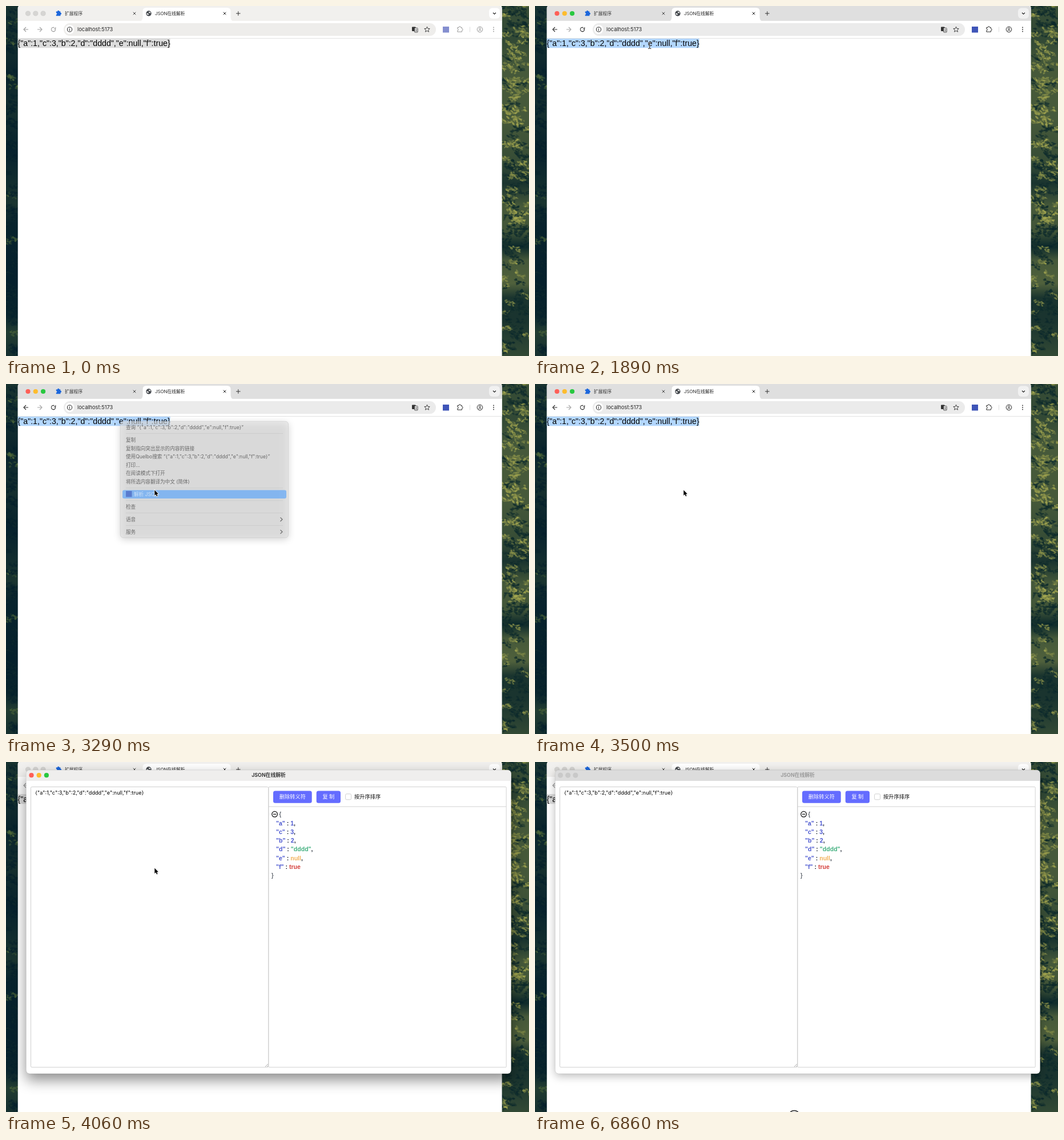
Write an HTML page with a canvas that moves like this. It is 916 by 612 pixels and loops after 6930 ms.

```html
<!DOCTYPE html>
<html lang="zh-CN">
<head>
<meta charset="utf-8">
<title>JSON在线解析</title>
<style>
html, body { margin: 0; width: 100%; height: 100%; overflow: hidden; background: #fff; }
canvas { display: block; }
</style>
</head>
<body>
<canvas id="stage" width="916" height="612"></canvas>
<script>
const W = 916, H = 612, LOOP = 6930, TICK = 70;
const LEFT = 20.5, WIDE = 848.3;
const UI = 'Inter, "Noto Sans CJK SC", "Noto Sans CJK", sans-serif';
const ARIAL = '"Liberation Sans", Arial, sans-serif';
const JSON_TEXT = '{"a":1,"c":3,"b":2,"d":"dddd","e":null,"f":true}';
const TITLE = 'JSON在线解析';
const LIGHTS = ['#fe5f57', '#febc2e', '#28c840'];
const ICON_BLUE = '#3f55b8';

const canvas = document.getElementById('stage');
let ctx = canvas.getContext('2d');

// Drawing helpers
function rect(x, y, w, h, fill) {
  ctx.fillStyle = fill;
  ctx.fillRect(x, y, w, h);
}

function box(x, y, w, h, r, fill, stroke, lw = 0.8) {
  ctx.beginPath();
  ctx.roundRect(x, y, w, h, r);
  if (fill) { ctx.fillStyle = fill; ctx.fill(); }
  if (stroke) { ctx.strokeStyle = stroke; ctx.lineWidth = lw; ctx.stroke(); }
}

function disc(x, y, r, fill, stroke, lw = 1) {
  ctx.beginPath();
  ctx.arc(x, y, r, 0, Math.PI * 2);
  if (fill) { ctx.fillStyle = fill; ctx.fill(); }
  if (stroke) { ctx.strokeStyle = stroke; ctx.lineWidth = lw; ctx.stroke(); }
}

function line(points, color, lw = 1, closed = false) {
  ctx.beginPath();
  for (let i = 0; i < points.length; i += 2) ctx.lineTo(points[i], points[i + 1]);
  if (closed) ctx.closePath();
  ctx.strokeStyle = color;
  ctx.lineWidth = lw;
  ctx.stroke();
}

// y is the optical middle of the line; returns the advance width
function text(s, x, y, size, color, { weight = 400, family = UI, align = 'left' } = {}) {
  ctx.font = `${weight} ${size}px ${family}`;
  ctx.textAlign = align;
  ctx.fillStyle = color;
  ctx.fillText(s, x, y + size * 0.36);
  return ctx.measureText(s).width;
}

function lerpKeys(keys, t) {
  let i = 1;
  while (i < keys.length - 1 && t > keys[i][0]) i++;
  const a = keys[i - 1], b = keys[i];
  const p = Math.min(1, Math.max(0, (t - a[0]) / (b[0] - a[0])));
  return a.slice(1).map((v, k) => v + (b[k + 1] - v) * p);
}

// Forest wallpaper, painted once as boughs of small leaves
function paintForest() {
  const layer = document.createElement('canvas');
  layer.width = W;
  layer.height = H;
  const screen = ctx;
  ctx = layer.getContext('2d');
  let seed = 41;
  const rnd = () => (seed = (seed * 16807) % 2147483647) / 2147483647;
  const mix = (a, b, p) => `rgb(${a.map((v, i) => Math.round(v + (b[i] - v) * p))})`;
  const sides = [
    { x: 0, w: 22, dark: [3, 30, 44], lit: [88, 112, 60], boughs: 80,
      keys: [[0, .4], [60, .35], [110, .15], [190, .35], [250, .06], [310, .3], [345, .45], [380, .1], [480, .04], [540, .12], [570, .6], [612, .35]] },
    { x: 868, w: 48, dark: [6, 36, 42], lit: [170, 172, 82], boughs: 170,
      keys: [[0, .5], [60, .45], [110, .65], [200, .65], [270, .5], [310, .2], [350, .65], [395, .6], [420, .05], [445, .65], [485, .75], [510, .2], [550, .2], [612, .45]] }
  ];
  for (const s of sides) {
    ctx.save();
    ctx.beginPath();
    ctx.rect(s.x, 0, s.w, H);
    ctx.clip();
    const g = ctx.createLinearGradient(0, 0, 0, H);
    for (const [y, v] of s.keys) g.addColorStop(y / H, mix(s.dark, s.lit, v * 0.6));
    rect(s.x, 0, s.w, H, g);
    for (let i = 0; i < s.boughs; i++) {
      const bx = s.x + rnd() * s.w, by = rnd() * H;
      const lit = rnd() < lerpKeys(s.keys, by)[0];
      const tilt = rnd() * 0.8 - 0.2;
      for (let k = 0; k < 12; k++) {
        const out = rnd() * 18 - 9;
        ctx.globalAlpha = 0.4 + rnd() * 0.4;
        ctx.fillStyle = mix(s.dark, s.lit, lit ? 0.55 + rnd() * 0.5 : rnd() * 0.15);
        ctx.beginPath();
        ctx.ellipse(bx + out, by + out * tilt + rnd() * 8 - 4, 1.8 + rnd() * 2.2, 1 + rnd() * 0.8,
          tilt + rnd() * 1.6 - 0.8, 0, Math.PI * 2);
        ctx.fill();
      }
    }
    ctx.restore();
  }
  ctx = screen;
  return layer;
}

// Small icons
function cross(x, y, r, color) {
  line([x - r, y - r, x + r, y + r], color, 1);
  line([x - r, y + r, x + r, y - r], color, 1);
}

function arrow(x, y, dir, color) {
  line([x - 4 * dir, y, x + 4 * dir, y], color, 1.1);
  line([x, y - 4, x + 4 * dir, y, x, y + 4], color, 1.1);
}

function puzzle(x, y, fill, stroke) {
  ctx.beginPath();
  ctx.moveTo(x - 4.2, y - 3);
  ctx.lineTo(x - 1.8, y - 3);
  ctx.arc(x - 0.3, y - 3.4, 1.5, Math.PI, 0);
  ctx.lineTo(x + 3.4, y - 3);
  ctx.lineTo(x + 3.4, y - 0.8);
  ctx.arc(x + 3.6, y + 0.7, 1.5, -Math.PI / 2, Math.PI / 2);
  ctx.lineTo(x + 3.4, y + 4.6);
  ctx.lineTo(x - 4.2, y + 4.6);
  ctx.lineTo(x - 4.2, y + 2.3);
  ctx.arc(x - 4.2, y + 0.8, 1.5, Math.PI / 2, -Math.PI / 2, true);
  ctx.closePath();
  if (fill) { ctx.fillStyle = fill; ctx.fill(); }
  else { ctx.strokeStyle = stroke; ctx.lineWidth = 1; ctx.stroke(); }
}

function star(x, y, r, color) {
  const pts = [];
  for (let i = 0; i < 10; i++) {
    const a = -Math.PI / 2 + i * Math.PI / 5, d = i % 2 ? r * 0.45 : r;
    pts.push(x + Math.cos(a) * d, y + Math.sin(a) * d);
  }
  line(pts, color, 0.9, true);
}

function globe(x, y) {
  disc(x, y, 4.7, '#45494e');
  ctx.fillStyle = '#f4f4f4';
  ctx.beginPath();
  ctx.ellipse(x - 1.8, y + 1, 1.9, 1.2, 0.6, 0, 7);
  ctx.ellipse(x + 1.6, y - 1.8, 1.9, 1, 0.4, 0, 7);
  ctx.fill();
}

function trafficLights(x, y, step, active, off) {
  LIGHTS.forEach((c, i) => disc(x + i * step, y, 4.1, active ? c : off, active ? null : '#c3c3c1', 0.5));
}

// Browser window
function drawTabs(active) {
  rect(LEFT, 0, WIDE, 27, active ? '#dfdfdf' : '#f1f0ee');
  trafficLights(38.5, 13, 13.3, active, '#d6d5d3');
  puzzle(92, 12.6, '#1b66dc');
  text('扩展程序', 103, 13, 7.8, '#333');
  cross(225, 13, 2.3, '#444');

  ctx.fillStyle = '#fff';
  ctx.beginPath();
  ctx.moveTo(233, 27);
  ctx.quadraticCurveTo(239, 27, 239.5, 20);
  ctx.lineTo(239.5, 9);
  ctx.quadraticCurveTo(239.5, 3, 246, 3);
  ctx.lineTo(387, 3);
  ctx.quadraticCurveTo(393.5, 3, 393.5, 9);
  ctx.lineTo(393.5, 20);
  ctx.quadraticCurveTo(394, 27, 400, 27);
  ctx.fill();
  globe(250, 13);
  text(TITLE, 261, 13, 7.8, '#222');
  cross(383, 13, 2.3, '#222');
  line([403, 13, 410.5, 13], '#333');
  line([406.8, 9.3, 406.8, 16.8], '#333');
  box(846, 3.5, 19, 18.5, 6, active ? '#f1f1f1' : '#fff');
  line([853, 11.8, 855.5, 14.2, 858, 11.8], '#222', 1.2);
}

function drawToolbar(active) {
  const ink = active ? '#2c2c2c' : '#999';
  rect(LEFT, 26, WIDE, 31, '#fff');
  arrow(35, 41, -1, ink);
  arrow(59, 41, 1, '#a3a3a3');
  ctx.beginPath();
  ctx.arc(83, 41, 3.6, -0.5, 5.2);
  ctx.strokeStyle = ink;
  ctx.lineWidth = 1.1;
  ctx.stroke();
  line([86.8, 37, 86.8, 40, 83.8, 40], ink);

  box(101, 30, 652, 22.3, 11, active ? '#ebebeb' : '#eeedeb');
  disc(111.5, 41, 8, '#fff');
  disc(111.5, 41, 4.1, null, '#222');
  line([111.5, 40.4, 111.5, 43.4], '#222');
  rect(111, 38.5, 1, 1, '#222');
  text('localhost:5173', 125, 41, 9.25, '#222');

  box(711, 36.5, 6.5, 7.5, 1, '#333');
  box(715.5, 38.5, 5.6, 7.5, 1, '#f4f4f4', '#333');
  text('文', 715.9, 42.3, 4.8, '#222');
  star(737.5, 41.2, 5, '#333');

  rect(765, 36, 11, 10.5, active ? ICON_BLUE : '#858fcf');
  puzzle(795, 40.6, null, ink);
  rect(812, 36.5, 0.8, 9, '#d5d5d5');
  disc(830, 41, 4.8, null, ink);
  disc(830, 39.7, 1.6, null, ink, 0.9);
  ctx.beginPath();
  ctx.arc(830, 46, 3.6, -2.5, -0.64);
  ctx.stroke();
  for (const y of [37.5, 41, 44.5]) disc(854, y, 0.9, ink);
  rect(LEFT, 56, WIDE, 1, '#e2e2e2');
}

function drawPage(t, active) {
  const size = 14.16;
  ctx.font = `400 ${size}px ${ARIAL}`;
  const upTo = n => LEFT + ctx.measureText(JSON_TEXT.slice(0, n)).width;
  let range = [0, JSON_TEXT.length];
  if (t >= 1540 && t < 1750) {
    const e = JSON_TEXT.indexOf('e"');
    range = t < 1680 ? [0, 0] : [e, e + 1];
  }
  const x = upTo(range[0]);
  rect(x, 57, upTo(range[1]) - x, 16.3, active ? '#b3d7fe' : '#dcdcdc');
  text(JSON_TEXT, LEFT, 65, size, '#000', { family: ARIAL });
}

function drawBrowser(t) {
  const active = t >= 1260 && t < 3640;
  ctx.save();
  ctx.beginPath();
  ctx.roundRect(LEFT, -1, WIDE, H + 20, 5);
  ctx.clip();
  rect(LEFT, 0, WIDE, H, '#fff');
  drawTabs(active);
  drawToolbar(active);
  drawPage(t, active);
  ctx.restore();
}

// Context menu: [label, middle y]
const MENU = [
  [`查询 “${JSON_TEXT}”`, 76],
  ['复制', 98],
  ['复制指向突出显示的内容的链接', 112.5],
  [`使用Quelbo搜索 “${JSON_TEXT}”`, 127],
  ['打印...', 141.8],
  ['在阅读模式下打开', 156.3],
  ['将所选内容翻译为中文 (简体)', 170.9],
  ['解析 JSON', 192.8],
  ['检查', 214.8],
  ['语音', 236.8],
  ['服务', 258.5]
];
const MENU_FADE = [[3150, 1], [3500, 0]];

function drawMenu(t, pointerY) {
  if (t < 2100 || t >= 3500) return;
  ctx.save();
  ctx.globalAlpha = lerpKeys(MENU_FADE, t)[0];
  ctx.shadowColor = 'rgba(0,0,0,.3)';
  ctx.shadowBlur = 13;
  ctx.shadowOffsetY = 3;
  box(200.3, 65.3, 294.2, 203.4, 5, '#dfdfdf');
  ctx.shadowColor = 'transparent';
  box(200.3, 65.3, 294.2, 203.4, 5, null, '#bdbdbd', 0.7);
  for (const y of [86.5, 181.8, 203.8, 225.5, 247.5]) rect(210, y - 0.4, 275, 0.9, '#c3c3c3');
  for (const [label, y] of MENU) {
    const hot = t >= 2380 && t !== 3080 && Math.abs(pointerY - y) < 7.4;
    const ink = hot ? '#fff' : '#1e1e1e';
    if (hot) box(204, y - 7.4, 287, 14.8, 3, '#4b9eff');
    const icon = y === 192.8;
    if (icon) rect(210, y - 5.8, 10.5, 10.5, ICON_BLUE);
    text(label, icon ? 224 : 210, y, 8.58, ink);
    if (y > 230) line([480.5, y - 3.4, 484, y, 480.5, y + 3.4], ink, 1.2);
  }
  ctx.restore();
}

// Parser window
const ROWS = [
  ['a', '1', '#4c58d0'], ['c', '3', '#4c58d0'], ['b', '2', '#4c58d0'],
  ['d', '"dddd"', '#42b07f'], ['e', 'null', '#f2b25c'], ['f', 'true', '#d5403c']
];

function drawTree() {
  const size = 10.56, bold = { weight: 700, family: ARIAL }, ink = '#1c2430';
  disc(470.6, 91.3, 4.9, null, '#111', 1.2);
  line([467.8, 91.3, 473.4, 91.3], '#111', 1.2);
  text('{', 478.5, 91.5, size, ink, { family: ARIAL });
  ROWS.forEach(([key, value, color], i) => {
    const y = 107 + i * 15.2;
    let x = 473;
    x += text(`"${key}"`, x, y, size, '#4c58d0', bold);
    x += text(' : ', x, y, size, ink, bold);
    x += text(value, x, y, size, color, bold);
    if (i < ROWS.length - 1) text(',', x, y, size, ink, bold);
  });
  text('}', 465, 198.3, size, ink, { family: ARIAL });
}

function button(label, x, w) {
  box(x, 50.4, w, 21.4, 3.5, '#646cff');
  text(label, x + w / 2, 61, 9.24, '#fff', { weight: 500, align: 'center' });
}

function drawParserBody(t) {
  box(43.5, 43.5, 416, 490.3, 2, '#fff', '#cfcfcf', 1);
  line([454, 533, 459, 528], '#888', 0.7);
  line([457, 533, 459, 531], '#888', 0.7);
  text(JSON_TEXT, 51, 54, 9.15, '#000');
  box(460, 43.5, 416.2, 490.3, 1, null, '#d2d2d2', 1);
  rect(460, 77.5, 416, 1, '#d2d2d2');
  button('删除转义符', 468, 67.7);
  button('复 制', 543.7, 42.3);
  box(594.6, 55.8, 10, 10, 2, '#fff', '#c4c4c4');
  text('按升序排序', 610, 61, 9.24, '#111');
  if (t >= 4060) drawTree();
}

function drawParser(t) {
  if (t < 3640) return;
  const active = t < 6860;
  const p = Math.min(1, (t - 3570) / 280);
  const scale = 0.9 + 0.1 * (1 - (1 - p) ** 2);
  ctx.save();
  ctx.globalAlpha = p;
  ctx.translate(460, 280);
  ctx.scale(scale, scale);
  ctx.translate(-460, -280);
  ctx.shadowColor = active ? 'rgba(0,0,0,.45)' : 'rgba(0,0,0,.28)';
  ctx.shadowBlur = active ? 25 : 16;
  ctx.shadowOffsetY = active ? 11 : 4;
  box(35.3, 14, 849.4, 531, 6, '#fff');
  ctx.shadowColor = 'transparent';
  box(35.3, 14, 849.4, 19, [6, 6, 0, 0], active ? '#efeeed' : '#dcdcdc');
  box(35.3, 14, 849.4, 531, 6, null, 'rgba(0,0,0,.16)', 0.6);
  trafficLights(44.5, 23.2, 13.2, active, '#c9c9c9');
  text(TITLE, 460, 23, 8.8, active ? '#3a3a3a' : '#9b9b9b', { weight: 700, align: 'center' });
  if (t >= 3780) drawParserBody(t);
  ctx.restore();
}

// Pointer
const MENU_PATH = [[2310, 200, 69], [2450, 218, 105], [2660, 251.3, 167], [2870, 260.3, 185.6]];
const EXIT_PATH = [[5600, 261.5, 190], [5810, 300, 262], [5950, 372, 425], [6020, 418, 560]];

function bezier(a, b, c, d, p) {
  const q = 1 - p;
  return q * q * q * a + 3 * q * q * p * b + 3 * q * p * p * c + p * p * p * d;
}

function pointerAt(t) {
  if (t < 420 || t >= 6090) return null;
  if (t < 1120) {
    const s = (t - 420) / 630, p = 1 - (1 - s) ** 1.6;
    return { x: bezier(372, 220, 78, 199.3, p), y: bezier(565, 420, 110, 71, p) };
  }
  if (t < 1540) return { x: 199.3, y: 69.3 };
  if (t < 2100) return { x: 200.8, y: 69.3, beam: true };
  const [x, y] = lerpKeys(t < 5600 ? MENU_PATH : EXIT_PATH, t);
  return { x, y, beam: t >= 5600 && y < 534 };
}

function drawPointer({ x, y, beam }) {
  ctx.save();
  ctx.translate(x, y);
  if (beam) {
    for (const [color, lw] of [['rgba(255,255,255,.8)', 2.2], ['#111', 1]]) {
      line([0, -4.8, 0, 4.8], color, lw);
      line([-2.6, -5.3, -0.8, -5, 0, -4.3, 0.8, -5, 2.6, -5.3], color, lw);
      line([-2.6, 5.3, -0.8, 5, 0, 4.3, 0.8, 5, 2.6, 5.3], color, lw);
    }
  } else {
    line([0, 0, 0, 9.4, 2.2, 7.4, 3.7, 10.9, 5.2, 10.2, 3.8, 6.9, 6.6, 6.7], '#fff', 1.5, true);
    ctx.fillStyle = '#000';
    ctx.fill();
  }
  ctx.restore();
}

const forest = paintForest();

function draw(t) {
  const pointer = pointerAt(t);
  ctx.drawImage(forest, 0, 0);
  drawBrowser(t);
  drawMenu(t, pointer ? pointer.y : 0);
  drawParser(t);
  if (t >= 6860) disc(454, 619.5, 10, '#fff', '#222', 1.3);
  if (pointer) drawPointer(pointer);
}

const start = performance.now();
function loop() {
  const t = (performance.now() - start) % LOOP;
  draw(Math.floor(t / TICK) * TICK);
  requestAnimationFrame(loop);
}
loop();
</script>
</body>
</html>
```
